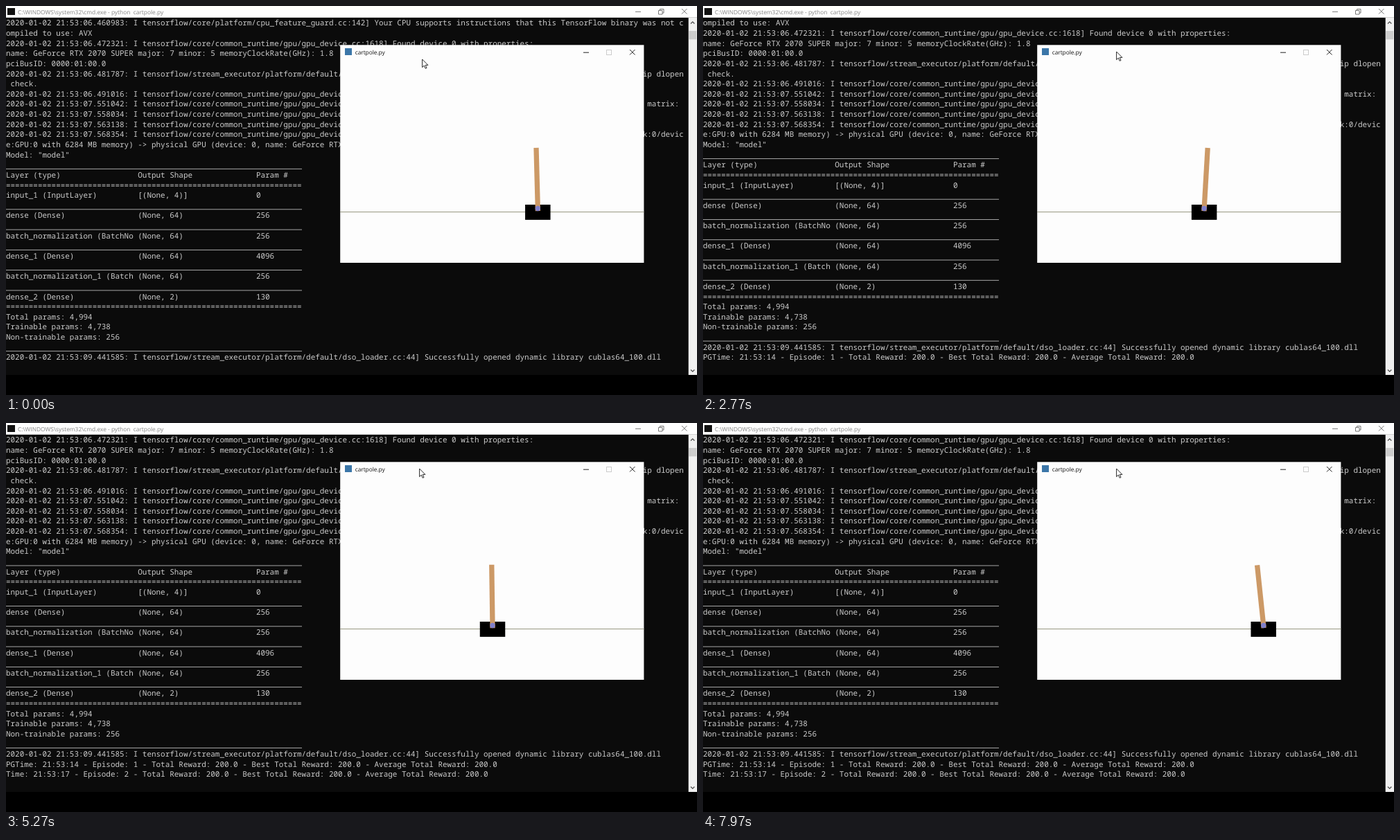
Animation, 997 px wide and 562 px high, one loop 8 s. Source, as an HTML page:

```html
<!DOCTYPE html>
<html lang="en">
<head>
<meta charset="utf-8">
<title>cartpole.py</title>
<style>
  html, body { margin: 0; width: 100%; height: 100%; overflow: hidden; background: #000; }
  svg { display: block; width: 100vw; height: 100vh; }
  text { white-space: pre; text-rendering: geometricPrecision; }
  #log text { font: 10.948px "Noto Sans Mono", monospace; fill: #ccc; }
  .title { font: 8.4px "Open Sans", sans-serif; }
  .line { fill: none; stroke-width: 1; }
</style>
</head>
<body>
<svg viewBox="0 0 997 562" preserveAspectRatio="none">
  <rect width="997" height="562" fill="#000"/>
  <rect y="17" width="985" height="516" fill="#0b0b0b"/>
  <g id="log"></g>

  <rect width="997" height="16.8" fill="#fefefe"/>
  <rect x="2" y="3" width="11" height="10" fill="#111"/>
  <text class="title" x="17" y="11.6" fill="#858585">C:\WINDOWS\system32\cmd.exe - python  cartpole.py</text>
  <path class="line" stroke="#777" d="M908 8.3h8M941.5 6.5h5.5v5.5h-5.5zM943.5 6.5v-2h5.5v5.5h-2M975 4l7.5 7.5M982.5 4l-7.5 7.5"/>

  <rect x="984.7" y="16.8" width="12.3" height="516.2" fill="#f0f0f0"/>
  <rect x="985.3" y="36" width="11" height="12.3" fill="#cdcdcd"/>
  <path class="line" stroke="#505050" style="stroke-width:1.3" d="M988 25.5l2.7-2.7 2.7 2.7M988 525.5l2.7 2.7 2.7-2.7"/>

  <rect x="482.2" y="56.3" width="438.2" height="314.7" fill="#fdfdfd"/>
  <rect x="489" y="61" width="10" height="10" fill="#3b76a8"/>
  <text class="title" x="503.7" y="69.9" fill="#111" style="font-size:8.3px">cartpole.py</text>
  <path class="line" stroke="#222" d="M833 67.2h8M900 63l7.5 7.5M907.5 63l-7.5 7.5"/>
  <rect class="line" x="866.5" y="63.5" width="7" height="7" stroke="#ccc"/>

  <path class="line" stroke="#96967e" d="M482.2 297.6h438.2"/>
  <g id="cart">
    <rect x="-18.25" y="287" width="36.5" height="21.9" fill="#000"/>
    <rect id="pole" x="-3.65" y="204.8" width="7.3" height="91.4" fill="#cc9966"/>
    <circle cy="292.5" r="3.65" fill="#8080cc"/>
  </g>
  <path id="mouse" d="M0 0v11.6l2.7-2.5 1.9 4.2 1.8-.8-1.8-4.1h3.7z" fill="#fff" stroke="#111" stroke-width=".9"/>
</svg>
<script>
const LOOP = 8000, STEP = 1000 / 30;
const ROW = 14.635, BASE = 28.4, COLS = 65, CHAR = 6.569;
const FIRST_RESET = 1200, SECOND_RESET = 5100;
const $ = id => document.getElementById(id);

const stamp = (time, rest) => `2020-01-02 21:53:${time}: I tensorflow/${rest}`;
const gpu = (time, rest) => stamp(time, `core/common_runtime/gpu/gpu_device.cc:${rest}`);
const cells = (a, b, c) => a.padEnd(29) + b.padEnd(26) + c;
const episode = (time, n) =>
  `Time: 21:53:${time} - Episode: ${n} - Total Reward: 200.0 - Best Total Reward: 200.0 - Average Total Reward: 200.0`;
const RULE = "_".repeat(COLS), DOUBLE = "=".repeat(COLS);

const rows = [
  stamp("06.460983", "core/platform/cpu_feature_guard.cc:142] Your CPU supports instructions that this TensorFlow binary was not c"),
  "ompiled to use: AVX",
  gpu("06.472321", "1618] Found device 0 with properties:"),
  "name: GeForce RTX 2070 SUPER major: 7 minor: 5 memoryClockRate(GHz): 1.8",
  "pciBusID: 0000:01:00.0",
  stamp("06.481787", "stream_executor/platform/default/dlopen_checker_stub.cc:25] GPU libraries are statically linked, skip dlopen"),
  " check.",
  gpu("06.491016", "1746] Adding visible gpu devices: 0"),
  gpu("07.551042", "1159] Device interconnect StreamExecutor with strength 1 edge matrix:"),
  gpu("07.558034", "1165]      0"),
  gpu("07.563138", "1178] 0:   N"),
  gpu("07.568354", "1304] Created TensorFlow device (/job:localhost/replica:0/task:0/devic"),
  "e:GPU:0 with 6284 MB memory) -> physical GPU (device: 0, name: GeForce RTX 2070 SUPER, pci bus id: 0000:01:00.0)",
  'Model: "model"',
  RULE,
  cells("Layer (type)", "Output Shape", "Param #"),
  DOUBLE,
  cells("input_1 (InputLayer)", "[(None, 4)]", "0"),
  RULE,
  cells("dense (Dense)", "(None, 64)", "256"),
  RULE,
  cells("batch_normalization (BatchNo", "(None, 64)", "256"),
  RULE,
  cells("dense_1 (Dense)", "(None, 64)", "4096"),
  RULE,
  cells("batch_normalization_1 (Batch", "(None, 64)", "256"),
  RULE,
  cells("dense_2 (Dense)", "(None, 2)", "130"),
  DOUBLE,
  "Total params: 4,994",
  "Trainable params: 4,738",
  "Non-trainable params: 256",
  RULE,
  stamp("09.441585", "stream_executor/platform/default/dso_loader.cc:44] Successfully opened dynamic library cublas64_100.dll"),
  "PG" + episode("14", 1),
  episode("17", 2)
];
const VISIBLE = 34;

function add(tag, attrs) {
  const el = document.createElementNS("http://www.w3.org/2000/svg", tag);
  for (const key in attrs) el.setAttribute(key, attrs[key]);
  return $("log").appendChild(el);
}

const lines = rows.map((row, i) => {
  const y = BASE + i * ROW;
  if (row === RULE) return add("rect", { y: y + 1.6, width: COLS * CHAR, height: .8, fill: "#ccc" });
  const el = add("text", { x: 0, y });
  el.textContent = row;
  return el;
});

// Each run holds [time, cart x, pole angle in degrees]
const runs = [
  [[0, 767.3, -1.5], [400, 763, -.5], [800, 757, 1], [1200, 752, -.5]],
  [[1200, 701.5, .6], [1630, 702, 1.8], [2200, 704, 2.6], [2770, 723.3, 3.3], [3200, 759, -1],
   [3670, 799.3, -6.2], [3950, 811, -4.5], [4500, 802, -1], [5100, 782, -1]],
  [[5100, 702.5, -1], [5270, 702, -.8], [6100, 701.5, 1.2], [6730, 717, 2.1], [7200, 747, .5],
   [7500, 771, -2.5], [7970, 809, -6], [8000, 811, -6.1]]
];

// Smooth curve through the keys of one column
function curve(keys, t, col) {
  let i = 0;
  while (i < keys.length - 2 && t >= keys[i + 1][0]) i++;
  const slope = j => {
    const a = keys[Math.max(j - 1, 0)], b = keys[Math.min(j + 1, keys.length - 1)];
    return (b[col] - a[col]) / (b[0] - a[0]);
  };
  const p = keys[i], q = keys[i + 1], d = q[0] - p[0], u = (t - p[0]) / d, v = 1 - u;
  return v * v * (1 + 2 * u) * p[col] + u * u * (3 - 2 * u) * q[col]
    + d * u * v * (v * slope(i) - u * slope(i + 1));
}

function draw(ms) {
  const t = Math.floor((ms % LOOP + 3.4) / STEP) * STEP % LOOP;
  const part = (t >= FIRST_RESET) + (t >= SECOND_RESET);
  const x = curve(runs[part], t, 1), angle = curve(runs[part], t, 2);
  $("cart").setAttribute("transform", `translate(${x.toFixed(2)} 0)`);
  $("pole").setAttribute("transform", `rotate(${angle.toFixed(2)} 0 292.5)`);

  $("log").setAttribute("transform", `translate(0 ${-part * ROW})`);
  lines.forEach((el, i) =>
    el.setAttribute("visibility", i >= part && i < part + VISIBLE ? "visible" : "hidden"));

  const u = Math.min(Math.max((t - 60) / 400, 0), 1), e = u * u * (3 - 2 * u);
  $("mouse").setAttribute("transform", `translate(${600.6 - 4 * e} ${77 - 11 * e})`);
}

let start;
function tick(now) {
  start ??= now;
  draw(now - start);
  requestAnimationFrame(tick);
}
draw(0);
requestAnimationFrame(tick);
</script>
</body>
</html>
```
